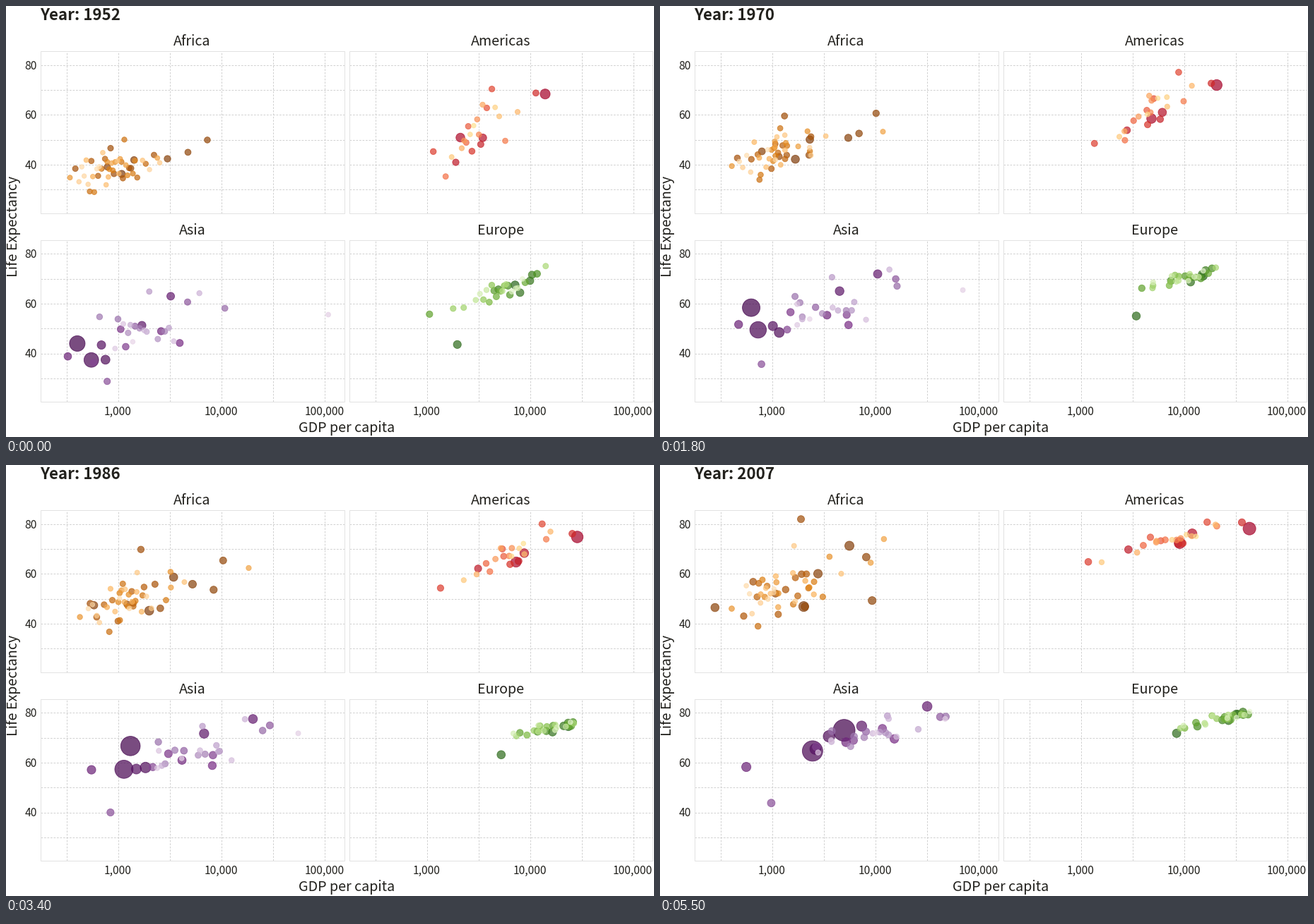
These frames come from a looping animation (917 px wide and 611 px high, 5.6 s). A matplotlib script:

```python
import numpy as np
import matplotlib.pyplot as plt
from matplotlib.animation import FuncAnimation
from matplotlib.colors import LinearSegmentedColormap
from matplotlib.patches import Rectangle

W, H, DPI = 917, 611, 64
PT = 72 / DPI                      # points per pixel
FIRST, LAST = 1952, 2007
KEYS = (1952, 1977, 2007)
INK = "#22211d"


def spread(rng, n):
    """Shuffled, evenly spaced quantiles of a bell curve."""
    u = (np.arange(n) + 0.5) / n
    return rng.permutation(np.log(u / (1 - u)) / 1.81)


def drift(rng, n, keep=0.85):
    """Bell-curve scores at each key year, each related to the one before."""
    scores = [spread(rng, n)]
    for _ in KEYS[1:]:
        scores.append(keep * scores[-1] + np.sqrt(1 - keep ** 2) * spread(rng, n))
    return np.array(scores)


class Panel:
    """A cloud of countries, largest population first.

    trend: per key year the mean and spread of log GDP, then mean life
    expectancy, its rise with wealth and its own spread.
    known: rank -> (GDP, life) at each key year for countries that stand out.
    """

    def __init__(self, name, left, top, n, ramp, trend, skew, giants, tail,
                 fall, shrink, known, seed):
        self.name, self.left, self.top = name, left, top
        self.colors = LinearSegmentedColormap.from_list(name, ramp)(
            np.linspace(0, 1, n))
        self.colors[:, 3] = 0.7

        rng = np.random.default_rng(seed)
        wealth, health = drift(rng, n), drift(rng, n)
        mean, sd, life, rise, noise = np.array(trend)[:, :, None].swapaxes(0, 1)
        self.log_gdp = mean + sd * (wealth + skew * (wealth ** 2 - 1))
        self.life = np.clip(life + rise * wealth + noise * health, 29, 82)
        for rank, points in known.items():
            gdp, age = np.array(points).T
            self.log_gdp[:, rank], self.life[:, rank] = np.log10(gdp), age

        k = np.arange(n - len(giants))
        pop = np.append(giants, tail / (1 + fall * k) * (1 - k / len(k)))
        self.diameter = [6.2 + 24.8 * np.sqrt(pop * f / 1319)
                         for f in (shrink, 1)]

    def x(self, log_gdp):
        return self.left + 110 + 146 * (log_gdp - 3)

    def y(self, life):
        return self.top + 19.8 + 3.53 * (80 - life)

    def at(self, year):
        """Dot centres and diameters in a given year."""
        i = 0 if year < KEYS[1] else 1
        t = (year - KEYS[i]) / (KEYS[i + 1] - KEYS[i])
        g, e = ((1 - t) * v[i] + t * v[i + 1] for v in (self.log_gdp, self.life))
        s = (year - FIRST) / (LAST - FIRST)
        small, big = self.diameter
        return np.column_stack([self.x(g), self.y(e)]), small + (big - small) * s


PANELS = [
    Panel("Africa", 49, 64, 52,
          ["#7f3b08", "#b35806", "#e08214", "#fdb863", "#fee0b6"],
          trend=[(2.98, 0.26, 39, 2, 4), (3.14, 0.30, 48.5, 3.5, 5),
                 (3.16, 0.34, 55, 4.5, 7)],
          skew=0.15, giants=[], tail=135, fall=0.33, shrink=0.27,
          known={0: [(1077, 36.3), (1982, 44.5), (2014, 46.9)],
                 1: [(1419, 41.9), (2785, 53.3), (5581, 71.3)],
                 3: [(781, 39.1), (796, 47.8), (278, 46.5)],
                 4: [(4725, 45), (8028, 55.5), (9270, 49.3)],
                 33: [(2388, 42.7), (21951, 57.4), (12057, 74)]},
          seed=4),
    Panel("Americas", 485.7, 64, 25,
          ["#a50026", "#d73027", "#f46d43", "#fdae61", "#fee090"],
          trend=[(3.47, 0.19, 52, 4, 7), (3.72, 0.19, 63.5, 4, 4.5),
                 (3.84, 0.26, 73, 2.5, 2.2)],
          skew=0, giants=[301, 190, 109], tail=44, fall=0.1, shrink=0.45,
          known={0: [(13990, 68.4), (24073, 73.4), (42952, 78.2)],
                 1: [(2109, 50.9), (6660, 61.5), (9066, 72.4)],
                 2: [(3478, 50.8), (7675, 65), (11978, 76.2)],
                 5: [(11367, 68.8), (22091, 74.2), (36319, 80.7)]},
          seed=7),
    Panel("Asia", 49, 331.6, 33,
          ["#40004b", "#762a83", "#9970ab", "#c2a5cf", "#e7d4e8"],
          trend=[(3.2, 0.33, 48.5, 4, 6.5), (3.58, 0.43, 61, 5, 5.5),
                 (3.85, 0.42, 70.5, 4.5, 2.8)],
          skew=0.05, giants=[1319, 1110], tail=224, fall=0.22, shrink=0.41,
          known={0: [(400, 44), (741, 64), (4959, 73)],
                 1: [(547, 37.4), (813, 54.2), (2452, 64.7)],
                 2: [(750, 37.5), (1383, 52.7), (3541, 70.6)],
                 3: [(685, 43.4), (1176, 54), (2606, 65.5)],
                 5: [(3217, 63), (16610, 75.4), (31656, 82.6)],
                 12: [(779, 28.8), (786, 38.4), (975, 43.8)],
                 31: [(108382, 55.6), (59265, 69.3), (47307, 77.6)]},
          seed=11),
    Panel("Europe", 485.7, 331.6, 30,
          ["#276419", "#4d9221", "#7fbc41", "#b8e186", "#e6f5d0"],
          trend=[(3.71, 0.25, 65.3, 4.5, 1.8), (4.1, 0.19, 72.2, 1.8, 1.1),
                 (4.35, 0.23, 77.6, 2.3, 0.9)],
          skew=-0.12, giants=[], tail=82, fall=0.1, shrink=0.75,
          known={0: [(7144, 67.5), (20513, 72.5), (32170, 79.4)],
                 1: [(1969, 43.6), (4269, 59.5), (8458, 71.8)],
                 3: [(9980, 69.2), (17429, 72.8), (33203, 79.4)]},
          seed=3),
]

plt.rcParams["font.family"] = ["Noto Sans CJK JP", "DejaVu Sans"]
fig = plt.figure(figsize=(W / DPI, H / DPI), dpi=DPI, facecolor="white")
ax = fig.add_axes([0, 0, 1, 1])
ax.set_xlim(0, W)
ax.set_ylim(H, 0)
ax.axis("off")


def label(x, y, text, px, ha="center", **kw):
    return ax.text(x, y, text, fontsize=px * PT, color=INK, ha=ha,
                   va="baseline", **kw)


def draw_panel(p):
    right, bottom = p.left + 429.7, p.top + 229.5
    grid = dict(color="#cccccc", lw=0.9 * PT, dashes=(3, 2), zorder=1)
    for half in range(6):
        x = p.x(2.5 + half / 2)
        ax.plot([x, x], [bottom, p.top], **grid)
    for life in range(30, 90, 10):
        ax.plot([p.left, right], [p.y(life)] * 2, **grid)
    ax.add_patch(Rectangle((p.left, p.top), right - p.left, bottom - p.top,
                           fill=False, ec="#e2e2e2", lw=PT, zorder=2))
    label((p.left + right) / 2 - 0.5, p.top - 8, p.name, 19.7)
    if p.left < 100:
        for life in (40, 60, 80):
            label(43.8, p.y(life) + 5.7, str(life), 15.7, "right")
    if p.top > 300:
        for exp in (3, 4, 5):
            label(p.x(exp) - 0.7, 579.5, f"{10 ** exp:,}", 15.5)


for panel in PANELS:
    draw_panel(panel)
label(482, 604, "GDP per capita", 19.7)
label(16.5, 312.5, "Life Expectancy", 19.7, rotation=90,
      rotation_mode="anchor")
title = label(48.5, 20.5, "", 22.3, "left", fontweight="bold")

colors = np.vstack([p.colors for p in PANELS])
dots = ax.scatter(np.zeros(len(colors)), np.zeros(len(colors)), c=colors,
                  edgecolors=colors, linewidths=0.9 * PT, zorder=3)


def update(i):
    year = FIRST + i
    centres, diameters = zip(*(p.at(year) for p in PANELS))
    dots.set_offsets(np.vstack(centres))
    dots.set_sizes((np.concatenate(diameters) * PT) ** 2)
    title.set_text(f"Year: {year}")
    return dots, title


anim = FuncAnimation(fig, update, frames=LAST - FIRST + 1, interval=100,
                     init_func=lambda: update(0), repeat=True, blit=False)
plt.show()
```
